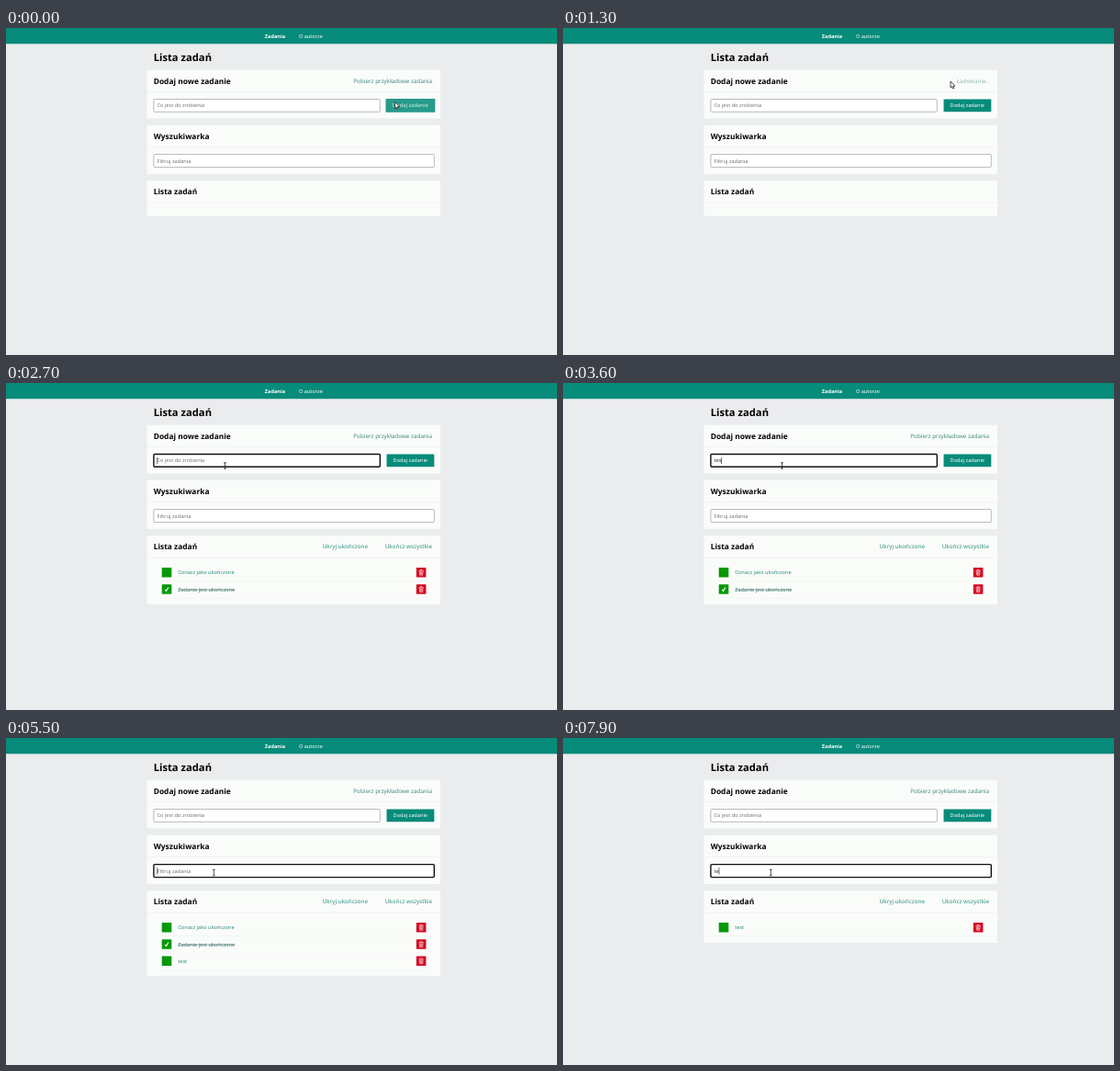
These frames come from a looping animation (600 by 356 pixels, 8000 ms). An HTML page with a canvas:

```html
<!DOCTYPE html>
<html lang="pl">
<head>
<meta charset="utf-8">
<title>Lista zadań</title>
<style>
html, body { margin: 0; width: 100%; height: 100%; overflow: hidden; background: #ebecee; }
canvas { display: block; width: 600px; height: 356px; }
</style>
</head>
<body>
<canvas id="stage"></canvas>
<script>
const W = 600, H = 356, LOOP = 8000;
const TEAL = '#078b7a', LINK = '#2f8d80', LINE = '#edf0ee';
const canvas = document.getElementById('stage');
const ctx = canvas.getContext('2d');
const dpr = window.devicePixelRatio || 1;
canvas.width = W * dpr;
canvas.height = H * dpr;

const ADD = { x: 160.9, y: 77.5, w: 246.4, h: 13.8 };
const FILTER = { x: 160.9, y: 137.6, w: 305.4, h: 14 };

// Moments of the scripted session, in ms
const CLICK_LOAD = 500, LOADED = 1500;
const FOCUS_ADD = 2650, SUBMIT = 4100, FOCUS_FILTER = 5300;
const addKeys = [[3050, 't'], [3300, 'te'], [3600, 'tes'], [3800, 'test'], [SUBMIT, '']];
const filterKeys = [[5700, 't'], [5900, 'te']];
const path = [
  [100, 423.5, 80.5], [400, 422, 58], [1800, 422, 58], [2150, 282, 168],
  [2250, 282, 168], [2600, 238.5, 90], [4650, 238.5, 90], [5150, 226.3, 146.5]
];

const clamp = v => Math.max(0, Math.min(1, v));
const ease = v => { v = clamp(v); return v * v * (3 - 2 * v); };
const inside = (p, b) => p.x >= b.x && p.x <= b.x + b.w && p.y >= b.y && p.y <= b.y + b.h;

function pointerAt(t) {
  let [t0, x0, y0] = path[0];
  for (const [t1, x1, y1] of path) {
    if (t < t1) {
      const k = t1 > t0 ? ease((t - t0) / (t1 - t0)) : 0;
      return { x: x0 + (x1 - x0) * k, y: y0 + (y1 - y0) * k };
    }
    [t0, x0, y0] = [t1, x1, y1];
  }
  return { x: x0, y: y0 };
}

function typed(keys, t, focusTime) {
  let state = { text: '', since: focusTime };
  for (const [at, text] of keys) if (t >= at) state = { text, since: at };
  return state;
}

function box(x, y, w, h, fill, r = 0) {
  ctx.fillStyle = fill;
  ctx.beginPath();
  ctx.roundRect(x, y, w, h, r);
  ctx.fill();
}

// Text is laid out at ten times its size so that advances stay unrounded
function text(str, x, y, size, color, { bold = false, align = 'left' } = {}) {
  ctx.save();
  ctx.translate(x, y);
  ctx.scale(0.1, 0.1);
  ctx.font = `${bold ? 700 : 400} ${size * 10}px "Noto Sans", "Open Sans", sans-serif`;
  ctx.textRendering = 'geometricPrecision';
  ctx.textAlign = align;
  ctx.fillStyle = color;
  ctx.fillText(str, 0, 0);
  const width = ctx.measureText(str).width / 10;
  ctx.restore();
  return width;
}

function card(top, bottom, line, title) {
  box(153.4, top, 319.7, bottom - top, '#fafcfa');
  box(153.4, line, 319.7, 0.7, LINE);
  text(title, 160.7, top + 15, 8.4, '#000', { bold: true });
}

function input(b, value, hint, focused, blinkTime) {
  ctx.beginPath();
  ctx.roundRect(b.x, b.y, b.w, b.h, 1);
  ctx.fillStyle = '#fff';
  ctx.fill();
  ctx.lineWidth = focused ? 1.4 : 0.7;
  ctx.strokeStyle = focused ? '#101010' : '#9a9e9c';
  ctx.stroke();
  const base = b.y + b.h / 2 + 2;
  const width = text(value || hint, b.x + 3.6, base, 5.6, value ? '#333' : '#757575');
  const blinkOn = Math.floor(blinkTime / 750) % 2 === 0;
  if (focused && blinkOn) box(b.x + 3.6 + (value ? width : 0), b.y + 3.4, 0.6, 7.4, '#111');
}

function addButton(hover) {
  const w = 51.8 + 2 * hover, h = 13.8 + 0.9 * hover;
  box(440.4 - w / 2, 84.4 - h / 2, w, h, TEAL, 0.6);
  if (hover) box(440.4 - w / 2, 84.4 - h / 2, w, h, `rgba(255,255,255,${0.13 * hover})`, 0.6);
  text('Dodaj zadanie', 440.3, 86.4, 5.6 * (1 + 0.04 * hover), `rgba(255,255,255,${1 - 0.18 * hover})`, { align: 'center' });
}

function trash(x, y) {
  box(x, y, 10.6, 10.6, '#d40a22', 0.5);
  ctx.strokeStyle = '#fff';
  ctx.lineWidth = 0.6;
  ctx.beginPath();
  ctx.moveTo(x + 2.9, y + 3.3);
  ctx.lineTo(x + 7.7, y + 3.3);
  ctx.moveTo(x + 4.4, y + 3);
  ctx.lineTo(x + 4.6, y + 2.4);
  ctx.lineTo(x + 6, y + 2.4);
  ctx.lineTo(x + 6.2, y + 3);
  ctx.moveTo(x + 3.4, y + 3.5);
  ctx.lineTo(x + 3.8, y + 8.2);
  ctx.lineTo(x + 6.8, y + 8.2);
  ctx.lineTo(x + 7.2, y + 3.5);
  for (const dx of [4.7, 5.9]) {
    ctx.moveTo(x + dx, y + 4.3);
    ctx.lineTo(x + dx, y + 7.3);
  }
  ctx.stroke();
}

function row(task, i) {
  const y = 201 + 18.25 * i;
  box(169.7, y, 10.6, 10.6, '#089808', 0.4);
  if (task.done) {
    ctx.strokeStyle = '#fff';
    ctx.lineWidth = 1.1;
    ctx.beginPath();
    ctx.moveTo(173.2, y + 5.6);
    ctx.lineTo(174.5, y + 7.2);
    ctx.lineTo(176.9, y + 3.3);
    ctx.stroke();
  }
  const color = task.done ? '#3c6f68' : LINK;
  const width = text(task.name, 187.2, y + 7.4, 5.6, color);
  if (task.done) box(187.2, y + 5.5, width, 0.6, color);
  trash(446.8, y);
  box(167.5, y + 14.4, 291.5, 0.6, LINE);
}

function arrow({ x, y }) {
  ctx.save();
  ctx.translate(x, y);
  ctx.beginPath();
  [[0, 0], [0, 7], [1.6, 5.6], [2.7, 8], [3.8, 7.5], [2.8, 5.2], [4.9, 5.1]]
    .forEach(([px, py]) => ctx.lineTo(px, py));
  ctx.closePath();
  ctx.fillStyle = '#fff';
  ctx.fill();
  ctx.strokeStyle = '#222';
  ctx.lineWidth = 0.8;
  ctx.stroke();
  ctx.restore();
}

function beam({ x, y }) {
  ctx.strokeStyle = '#222';
  ctx.lineWidth = 0.8;
  ctx.beginPath();
  ctx.moveTo(x, y - 3);
  ctx.lineTo(x, y + 3);
  for (const dy of [-3.2, 3.2]) {
    ctx.moveTo(x - 1.5, y + dy);
    ctx.lineTo(x + 1.5, y + dy);
  }
  ctx.stroke();
}

function tasksAt(t, query) {
  const tasks = [];
  if (t >= LOADED) tasks.push({ name: 'Oznacz jako ukończone' }, { name: 'Zadanie jest ukończone', done: true });
  if (t >= SUBMIT) tasks.push({ name: 'test' });
  // The short query only matches from the start of a word
  return tasks.filter(({ name }) => name.toLowerCase().split(' ').some(word => word.startsWith(query)));
}

function draw(t) {
  ctx.setTransform(dpr, 0, 0, dpr, 0, 0);
  box(0, 0, W, H, '#ebecee');
  box(0, 0, W, 17.3, TEAL);
  text('Zadania', 281.8, 10.8, 5.6, '#fff', { bold: true });
  text('O autorze', 318.9, 10.8, 5.6, '#fff');
  text('Lista zadań', 160.7, 36, 11.2, '#000', { bold: true });

  const add = typed(addKeys, t, FOCUS_ADD);
  const filter = typed(filterKeys, t, FOCUS_FILTER);
  const tasks = tasksAt(t, filter.text);

  card(45.7, 98.5, 69.2, 'Dodaj nowe zadanie');
  const loading = t >= CLICK_LOAD && t < LOADED;
  text(loading ? 'Ładowanie..' : 'Pobierz przykładowe zadania', 464, 59.9, 6.3,
    loading ? '#8bbbb3' : '#43897f', { align: 'right' });
  input(ADD, add.text, 'Co jest do zrobienia', t >= FOCUS_ADD && t < FOCUS_FILTER, t - add.since);
  addButton(1 - ease((t - 150) / 200));

  card(105.8, 159, 129.6, 'Wyszukiwarka');
  input(FILTER, filter.text, 'Filtruj zadania', t >= FOCUS_FILTER, t - filter.since);

  card(166.3, 204.7 + 18.2 * tasks.length, 189.8, 'Lista zadań');
  if (t >= LOADED) {
    text('Ukryj ukończone', 394, 180.3, 6.3, LINK, { align: 'right' });
    text('Ukończ wszystkie', 464, 180.3, 6.3, LINK, { align: 'right' });
  }
  tasks.forEach(row);

  const pointer = pointerAt(t);
  (inside(pointer, ADD) || inside(pointer, FILTER) ? beam : arrow)(pointer);
}

const start = performance.now();
function tick() {
  draw((performance.now() - start) % LOOP);
  requestAnimationFrame(tick);
}
draw(0);
requestAnimationFrame(tick);
</script>
</body>
</html>
```
